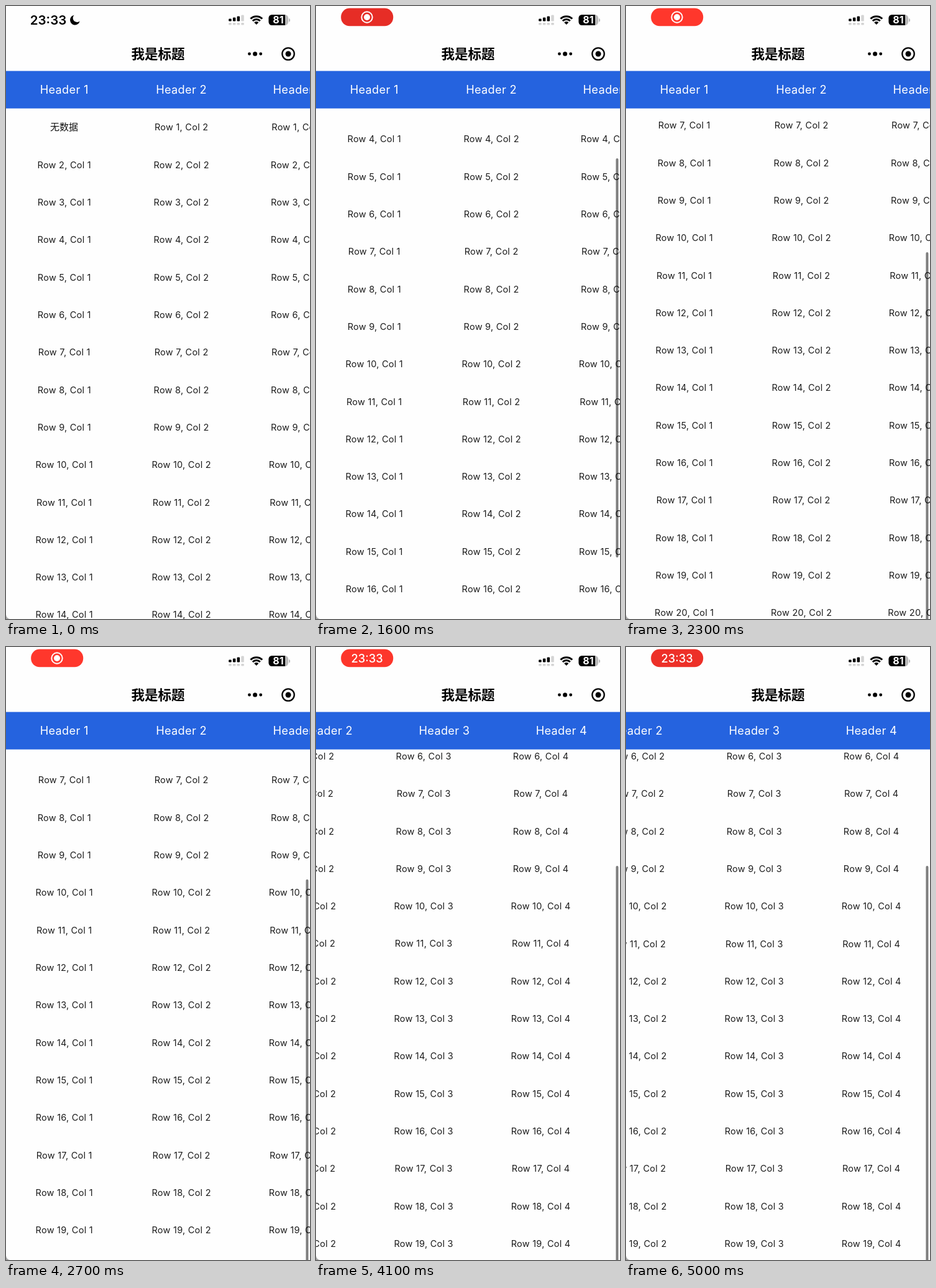
Animation, 489 px wide and 986 px high, one loop 5100 ms. Source, as an HTML page with a canvas:

```html
<!DOCTYPE html>
<html lang="zh">
<head>
<meta charset="utf-8">
<title>Table</title>
<style>
html, body { margin: 0; width: 100%; height: 100%; overflow: hidden; background: #fefefe; }
canvas { display: block; width: 489px; height: 986px; }
</style>
</head>
<body>
<canvas id="stage"></canvas>
<script>
const W = 489, H = 986, LOOP = 5100, STEP = 100;
const ROW = 60.33, COL = 188.4, MAX_X = 264, MAX_Y = 321;
const LATIN = 'Inter, "Noto Sans CJK SC", "Noto Sans CJK", sans-serif';
const CJK = '"Noto Sans CJK SC", "Noto Sans CJK", sans-serif';
const canvas = document.getElementById('stage');
const ctx = canvas.getContext('2d');
const dpr = window.devicePixelRatio || 1;
canvas.width = W * dpr;
canvas.height = H * dpr;

const clamp = (v, a = 0, b = 1) => Math.min(b, Math.max(a, v));

// Smooth curve through [time, value] points, at rest at both ends.
function along(points, t) {
  const last = points.length - 1;
  if (t <= points[0][0]) return points[0][1];
  if (t >= points[last][0]) return points[last][1];
  let i = 0;
  while (t > points[i + 1][0]) i++;
  const slope = k => k === 0 || k === last ? 0 :
    (points[k + 1][1] - points[k - 1][1]) / (points[k + 1][0] - points[k - 1][0]);
  const [t0, a] = points[i], [t1, b] = points[i + 1];
  const d = t1 - t0, p = (t - t0) / d, q = 1 - p;
  return a * q * q * (1 + 2 * p) + b * p * p * (3 - 2 * p) +
    d * p * q * (slope(i) * q - slope(i + 1) * p);
}

// A drag past the limit, then a critically damped bounce back to it.
function dragAndBounce(points, limit, t) {
  const [release, peak] = points[points.length - 1];
  if (t <= release) return along(points, t);
  const u = (t - release) * 0.0093;
  return limit + (peak - limit) * (1 + u) * Math.exp(-u);
}

const DRAG_Y = [[500, 0], [900, 38], [1600, 162], [2050, 312], [2300, 365], [2500, 370]];
const DRAG_X = [[3500, 0], [3600, 40], [3800, 150], [4000, 258], [4200, 316]];
const scrollY = t => dragAndBounce(DRAG_Y, MAX_Y, t);
const scrollX = t => dragAndBounce(DRAG_X, MAX_X, t);

function text(str, x, y, font, color, spacing = 0) {
  ctx.font = font;
  ctx.letterSpacing = spacing + 'px';
  ctx.fillStyle = color;
  ctx.textAlign = 'center';
  ctx.fillText(str, x + spacing / 2, y);
}

function rect(x, y, w, h, r, color) {
  ctx.fillStyle = color;
  ctx.beginPath();
  ctx.roundRect(x, y, w, h, r);
  ctx.fill();
}

function disc(x, y, r, color) {
  ctx.fillStyle = color;
  ctx.beginPath();
  ctx.arc(x, y, r, 0, Math.PI * 2);
  ctx.fill();
}

function ring(x, y, r, width, color) {
  ctx.strokeStyle = color;
  ctx.lineWidth = width;
  ctx.beginPath();
  ctx.arc(x, y, r, 0, Math.PI * 2);
  ctx.stroke();
}

function moon() {
  ctx.fillStyle = '#000';
  ctx.beginPath();
  ctx.arc(111, 22.5, 8, 0.3, -1.75);
  ctx.arc(114.2, 19.3, 6.6, -2.2, 0.95, true);
  ctx.closePath();
  ctx.fill();
}

function clock(t) {
  const shown = clamp((t - 300) / 300);
  if (shown < 1) {
    ctx.globalAlpha = 1 - shown;
    text('23:33', 68, 30, '600 20.5px ' + LATIN, '#000');
    moon();
  }
  if (shown > 0) {
    const glow = clamp(0.5 - 0.8 * Math.cos(2 * Math.PI * (t - 3450) / 1950));
    const red = `rgb(${230 + 25 * glow}, ${45 + 10 * glow}, ${38 + 6 * glow})`;
    ctx.globalAlpha = shown;
    rect(40.2, 3.6, 84, 28.6, 13.8, red);
    const label = clamp((t - 3550) / 350);
    ctx.globalAlpha = shown * clamp((3850 - t) / 250);
    ring(82, 18, 8.7, 2, '#fff');
    disc(82, 18, 5, '#fff');
    ctx.globalAlpha = label;
    text('23:33', 82, 24.7, '500 18.3px ' + LATIN, '#fff');
  }
  ctx.globalAlpha = 1;
}

function status() {
  for (let i = 0; i < 4; i++) {
    const x = 358.2 + i * 6.7, h = 4 + i * 2;
    rect(x, 24.5 - h, 4.5, h, 1.2, i < 3 ? '#000' : '#d4d4d4');
    rect(x, 27, 4.5, 3.5, 1.2, '#d4d4d4');
  }
  // Wi-Fi fan
  const cx = 402.8, cy = 30, half = Math.PI / 4;
  ctx.strokeStyle = ctx.fillStyle = '#000';
  ctx.lineWidth = 2.9;
  for (const r of [13.3, 8.5]) {
    ctx.beginPath();
    ctx.arc(cx, cy, r, -Math.PI / 2 - half, -Math.PI / 2 + half);
    ctx.stroke();
  }
  ctx.beginPath();
  ctx.moveTo(cx, cy);
  ctx.arc(cx, cy, 5, -Math.PI / 2 - half, -Math.PI / 2 + half);
  ctx.fill();
  // Battery
  rect(422.5, 14, 31.5, 17, 5.2, '#b9b9b9');
  rect(422.5, 14, 26.5, 17, [5.2, 0, 0, 5.2], '#000');
  rect(455, 20, 2, 5.5, [0, 2, 2, 0], '#b9b9b9');
  text('81', 438, 28.3, '700 16px ' + LATIN, '#fff');
}

function titleBar() {
  text('我是标题', 244.5, 85, '600 21.5px ' + CJK, '#000');
  [[391.5, 2.4], [400.6, 3.5], [409.7, 2.4]].forEach(([x, r]) => disc(x, 77, r, '#000'));
  ring(454, 77, 9.7, 2.3, '#000');
  disc(454, 77, 4.5, '#000');
}

function table(x, y, headX) {
  ctx.save();
  ctx.beginPath();
  ctx.rect(0, 164, W, H - 164);
  ctx.clip();
  for (let r = 1; r <= 20; r++) {
    const base = 200.2 + (r - 1) * ROW - y;
    if (base < 150 || base > H + 20) continue;
    for (let c = 1; c <= 4; c++) {
      const cx = 93.6 + (c - 1) * COL - x;
      if (r === 1 && c === 1) text('无数据', cx, base + 0.2, '300 15px ' + CJK, '#111');
      else text(`Row ${r}, Col ${c}`, cx, base, '400 14.5px ' + LATIN, '#1c1c1c', 0.25);
    }
  }
  ctx.restore();
  rect(0, 104.5, W, 60.3, 0, '#2563df');
  for (let c = 1; c <= 4; c++) {
    text('Header ' + c, 93.5 + (c - 1) * COL - headX, 141.2, '400 18.2px ' + LATIN, '#fff', 0.3);
  }
}

function scrollbar(t, y) {
  const inside = Math.min(y, MAX_Y);
  const top = (inside < 162 ? 108 + inside * 0.846 : 245 + (inside - 162) * 0.673) + y - inside;
  const bottom = Math.min(top + 642, 994);
  ctx.globalAlpha = clamp((t - 450) / 200);
  rect(482.4, top, 4, bottom - top, 2, 'rgba(0, 0, 0, 0.5)');
  ctx.globalAlpha = 1;
}

function corner() {
  ctx.fillStyle = '#a5a5a5';
  ctx.beginPath();
  ctx.moveTo(0, H - 7);
  ctx.quadraticCurveTo(1, H - 1, 6, H);
  ctx.lineTo(0, H);
  ctx.fill();
}

function draw(t) {
  ctx.setTransform(dpr, 0, 0, dpr, 0, 0);
  ctx.fillStyle = '#fefefe';
  ctx.fillRect(0, 0, W, H);
  const y = scrollY(t);
  table(scrollX(t), y, Math.min(scrollX(t - 46), MAX_X));
  scrollbar(t, y);
  titleBar();
  clock(t);
  status();
  corner();
}

const start = performance.now();
function tick() {
  const t = (performance.now() - start) % LOOP;
  const held = Math.floor(t / STEP) * STEP;
  draw(held < 400 ? 0 : held);
  requestAnimationFrame(tick);
}
tick();
</script>
</body>
</html>
```
